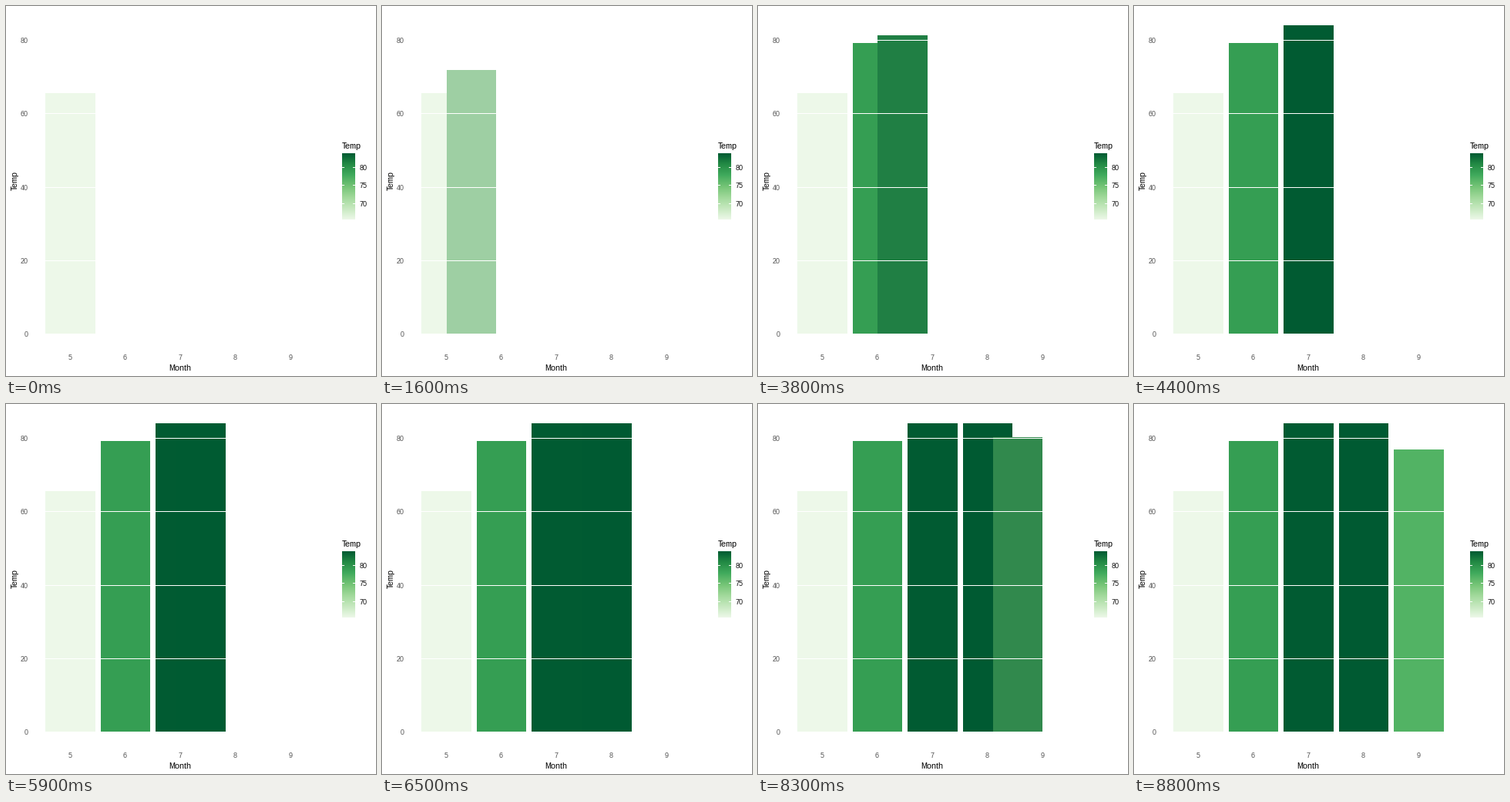
These frames come from a looping animation (480 by 480 pixels, 10000 ms). A matplotlib script:

```python
import numpy as np
import matplotlib as mpl
import matplotlib.pyplot as plt
from matplotlib.animation import FuncAnimation
from matplotlib.patches import Rectangle

mpl.rcParams["font.family"] = "Liberation Sans"
mpl.rcParams["text.hinting"] = "native"
mpl.rcParams["text.hinting_factor"] = 1

SIZE = 480
HOLD, MOVE = 12, 10             # frames at rest, frames in motion
MONTHS = [5, 6, 7, 8, 9]
TEMPS = np.array([65.548, 79.1, 83.903, 83.968, 76.9])
LOW, HIGH = TEMPS.min(), TEMPS.max()
GREENS = ["#EDF8E9", "#C7E9C0", "#A1D99B", "#74C476",
          "#41AB5D", "#238B45", "#005A32"]

LEFT, PITCH, WIDTH = 51.1, 71.58, 64.42
BASE, UNIT = 425.1, 4.764

TO_XYZ = np.array([[0.4124564, 0.3575761, 0.1804375],
                   [0.2126729, 0.7151522, 0.0721750],
                   [0.0193339, 0.1191920, 0.9503041]])
WHITE = TO_XYZ.sum(axis=1)


def to_lab(color):
    c = np.array(mpl.colors.to_rgb(color))
    lin = np.where(c > 0.04045, ((c + 0.055) / 1.055) ** 2.4, c / 12.92)
    t = TO_XYZ @ lin / WHITE
    x, y, z = np.where(t > 0.008856, np.cbrt(t), 7.787 * t + 16 / 116)
    return np.array([116 * y - 16, 500 * (x - y), 200 * (y - z)])


def to_rgb(lab):
    y = (lab[0] + 16) / 116
    f = np.array([y + lab[1] / 500, y, y - lab[2] / 200])
    xyz = np.where(f > 0.2069, f ** 3, (f - 16 / 116) / 7.787) * WHITE
    lin = np.clip(np.linalg.solve(TO_XYZ, xyz), 0, 1)
    c = np.where(lin > 0.0031308, 1.055 * lin ** (1 / 2.4) - 0.055, 12.92 * lin)
    return np.clip(c, 0, 1)


STOPS = np.array([to_lab(c) for c in GREENS])


def fill_lab(temp):
    pos = (temp - LOW) / (HIGH - LOW) * (len(STOPS) - 1)
    return np.array([np.interp(pos, range(len(STOPS)), ch) for ch in STOPS.T])


FILLS = [fill_lab(t) for t in TEMPS]


def px(v):
    return int(np.floor(v + 0.5))


fig = plt.figure(figsize=(SIZE / 100, SIZE / 100), dpi=100, facecolor="white")
ax = fig.add_axes([0, 0, 1, 1])
ax.set_xlim(0, SIZE)
ax.set_ylim(SIZE, 0)
ax.axis("off")


def box(x, y, w, h, color, z=1):
    return ax.add_patch(Rectangle((x, y), w, h, fc=color, lw=0, zorder=z))


def label(x, y, text, size, color="black", ha="left", **kw):
    ax.text(x, y, text, fontsize=size * 0.72, color=color, ha=ha,
            va="baseline", **kw)


def place(bar, slot, temp, lab):
    x0 = px(LEFT + PITCH * slot)
    x1 = px(LEFT + PITCH * slot + WIDTH)
    y0 = px(BASE - UNIT * temp)
    bar.set_bounds(x0, y0, x1 - x0, px(BASE) - y0)
    bar.set_facecolor(to_rgb(lab))


# Bars, with white grid lines on top
bars = [box(0, 0, 0, 0, "white", 2) for _ in TEMPS]
for i, bar in enumerate(bars):
    place(bar, i, TEMPS[i], FILLS[i])
mover = box(0, 0, 0, 0, "white", 3)
for value in range(0, 81, 20):
    y = px(BASE - UNIT * value)
    box(40, y, 374, 1, "white", 4)
    label(29, y + 4, str(value), 9, "#4D4D4D", "right")

# Axis text
for i, month in enumerate(MONTHS):
    label(82.7 + PITCH * i, 459, str(month), 9, "#4D4D4D", "center")
label(225.5, 473, "Month", 11, ha="center")
label(15, 239, "Temp", 11, rotation=90, rotation_mode="anchor")

# Colour bar
KEY_X, KEY_Y, KEY_W, KEY_H = 436, 191, 17, 86
rows = HIGH - (np.arange(KEY_H) + 0.5) / KEY_H * (HIGH - LOW)
ramp = np.array([[to_rgb(fill_lab(t))] for t in rows])
ax.imshow(ramp, extent=(KEY_X, KEY_X + KEY_W, KEY_Y + KEY_H, KEY_Y),
          aspect="auto", interpolation="nearest", zorder=1)
label(KEY_X, 185, "Temp", 11)
for value in (80, 75, 70):
    y = int(KEY_Y + (HIGH - value) / (HIGH - LOW) * KEY_H)
    box(KEY_X, y, 3, 1, "white", 4)
    box(KEY_X + KEY_W - 3, y, 3, 1, "white", 4)
    label(459, y + 4, str(value), 9)


def update(frame):
    state, step = divmod(frame, HOLD + MOVE)
    p = max(0, step - HOLD + 1) / (MOVE + 1)
    nxt = min(state + 1, len(TEMPS) - 1)
    for i, bar in enumerate(bars):
        bar.set_visible(i <= state)
    place(mover, state + p,
          TEMPS[state] * (1 - p) + TEMPS[nxt] * p,
          FILLS[state] * (1 - p) + FILLS[nxt] * p)
    return [*bars, mover]


anim = FuncAnimation(fig, update, frames=100, interval=100,
                     repeat=True, repeat_delay=0, blit=False)
plt.show()
```
